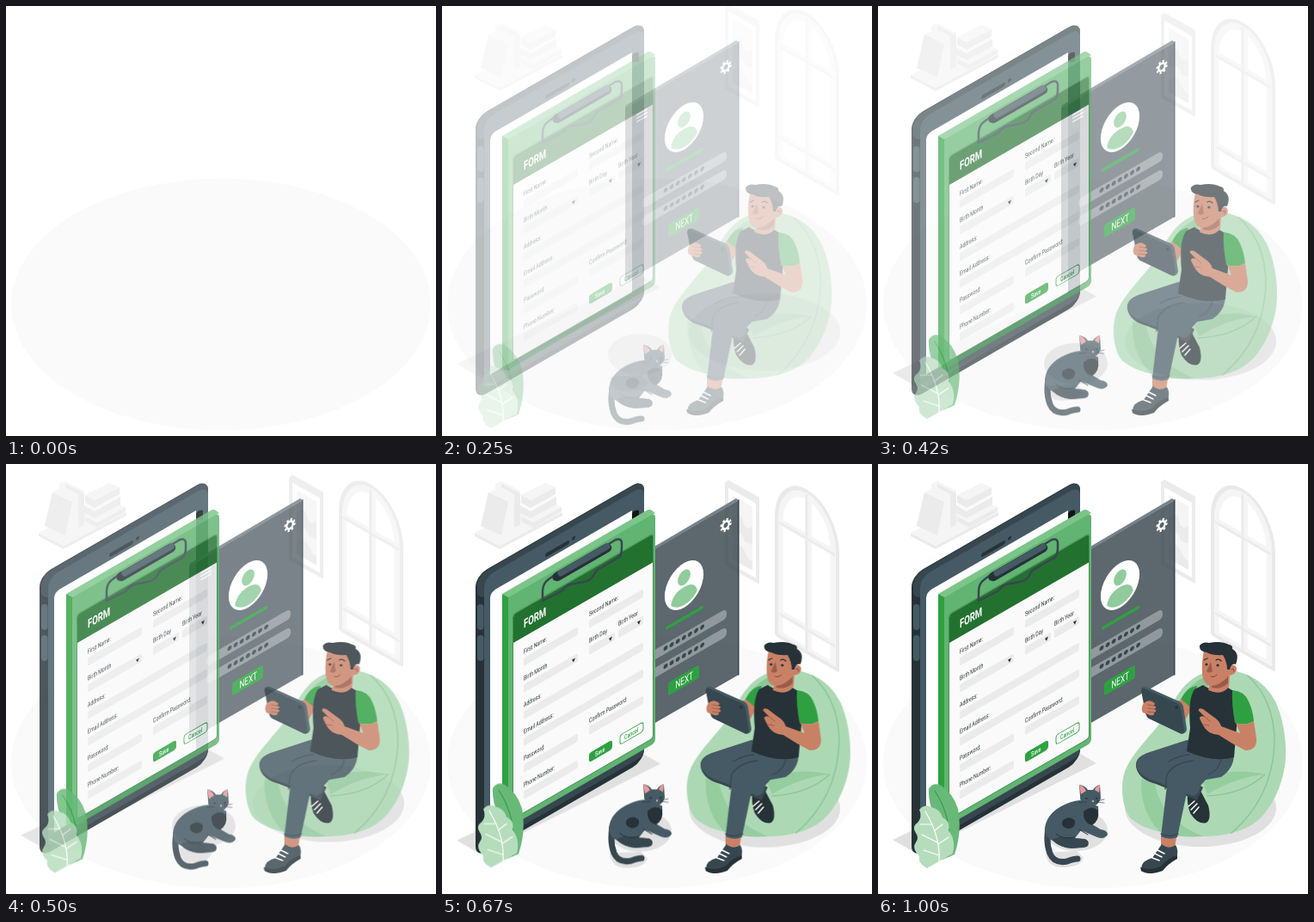
An HTML page that plays this animation: 500x500 px, repeating every 1040 ms.

```html
<!DOCTYPE html>
<html lang="en">
<head>
<meta charset="utf-8">
<title>Form</title>
<style>
  html, body { margin: 0; width: 100%; height: 100%; overflow: hidden; background: #fff; }
  svg { display: block; width: 100vw; height: 100vh; }
  text { font-family: Roboto, "Open Sans", sans-serif; }
  .line { fill: none; stroke-linecap: round; stroke-linejoin: round; }
  .ink { fill: #263238; } .slate { fill: #37474f; } .steel { fill: #455a64; }
  .green { fill: #2fa042; } .skin { fill: #c98166; } .soft { fill: #ebebeb; }
  .pale { fill: #f5f5f5; } .mint { fill: #acd9b3; }
</style>
</head>
<body>
<svg viewBox="0 0 500 500">
  <ellipse cx="250" cy="347" rx="244" ry="146.500" fill="#fafafa"/>

  <g data-move="fade">
    <path class="soft" d="M38 80L67 95L140 56V60L67 99L38 84Z"/>
    <path class="pale" d="M38 80L111 41L140 56L67 95Z"/>
    <path class="pale" d="M62 23L69 20L91 31V71L84 75L62 64Z"/>
    <path class="soft" d="M69 23L91 34V71L84 74V35L69 27Z"/>
    <path class="pale" d="M54 33L60 30L84 41L76 80L69 83L45 72Z"/>
    <path class="soft" d="M54 33L77 44L69 83L45 72Z"/>
    <path class="soft" d="M92 61L106 68L139 50V55L106 74L92 67Z"/>
    <path class="pale" d="M92 61L124 43L139 50L106 68Z"/>
    <path class="soft" d="M91 48L103 55L133 38V47L103 63L91 57Z"/>
    <path fill="#fafafa" d="M91 48L121 31L133 38L103 55Z"/>
    <path class="soft" d="M92 36L103 42L132 27V35L103 51L92 45Z"/>
    <path class="pale" d="M92 36L120 22L132 27L103 42Z"/>
  </g>

  <g data-move="down">
    <path class="soft" d="M329 21L333 18L369 38V139L365 137L329 117Z"/>
    <path fill="#fff" d="M333 27L365 45V132L333 114Z"/>
    <path class="pale" d="M338 36L361 49V123L338 110Z"/>
    <path class="soft" d="M338 62Q347 54 350 66T361 72V92Q352 92 350 84T338 82ZM338 98Q346 88 352 101T361 112V123L338 110Z"/>
    <g class="line" transform="matrix(1 .577 0 1 386 0)">
      <path stroke="#f5f5f5" stroke-width="9" d="M6 194V60A32 46 0 0 1 70 60V194Z"/>
      <path stroke="#f5f5f5" stroke-width="8" d="M40 15V193M6 62H70M6 168H70"/>
      <path stroke="#e9e9e9" stroke-width="4" d="M3 196V60A35.500 51 0 0 1 74 60V196Z"/>
      <path stroke="#ebebeb" stroke-width="3" d="M38 14V193M7 64H70M7 170H70"/>
    </g>
  </g>

  <g data-move="down" fill="#e0e0e0">
    <path d="M17 437L45 453L254 348L232 335Z"/>
    <ellipse cx="375" cy="400" rx="88" ry="45"/>
    <ellipse cx="230" cy="426" rx="37" ry="24"/>
    <path d="M195 452Q196 470 218 469Q236 468 239 458L231 450Z"/>
  </g>

  <g data-move="fade">
    <g transform="matrix(1 -.577 0 1 39 0)">
      <rect class="ink" y="130" width="196" height="328" rx="13"/>
      <rect class="slate" x="2" y="131" width="194" height="30" rx="12"/>
      <rect class="steel" x="10" y="138" width="186" height="314" rx="11"/>
      <path fill="#fff" d="M17 166Q17 159 24 159H182V438H17Z"/>
      <path class="slate" d="M10 439H196V445Q196 452 188 452H18Q10 452 10 444Z"/>
      <rect class="ink" x="81" y="151" width="28" height="4.500" rx="2.200"/>
      <circle class="ink" cx="114" cy="152" r="2"/>
    </g>
    <path fill="#101719" d="M221 65V58Q223 53 229 54V65Z"/>
    <g class="steel">
      <rect x="41" y="163" width="7.500" height="30" rx="3.700"/>
      <rect x="41" y="199" width="7.500" height="30" rx="3.700"/>
    </g>
  </g>

  <g data-move="fade">
    <path fill="#2c3a43" fill-opacity=".77" d="M213 118L345 42V245L213 321Z"/>
    <path fill="#76828a" d="M213 116L342 40L345 42L216 118Z"/>
    <path class="slate" d="M344 42L345.500 41V245L344 246Z"/>
    <g id="panel" transform="matrix(1 -.577 0 1 233 0)">
      <path class="line" stroke="#fff" stroke-width="1.800" d="M-6 123H5M-6 127H5M-6 131H5"/>
      <g fill="#fff" fill-opacity=".33">
        <rect y="224.500" width="98" height="11.500" rx="5"/>
        <rect y="245.500" width="98" height="11.500" rx="5"/>
      </g>
      <rect class="green" x="27" y="205" width="44" height="4" rx="2"/>
      <rect class="green" x="30" y="271.500" width="36" height="15.500" rx="2.500"/>
    </g>
    <g transform="matrix(.87 -.5 0 1 281.500 141)">
      <clipPath id="disc"><circle r="23"/></clipPath>
      <circle r="26" fill="#fff"/>
      <g fill="#8fcb9b">
        <circle cy="-9" r="8.500"/>
        <path d="M-18 18Q-17 2 0 2T18 18Q10 26 0 25T-18 18Z" clip-path="url(#disc)"/>
      </g>
    </g>
    <g transform="matrix(.87 -.4 0 1 330 71)" fill="none" stroke="#fff">
      <circle r="4.300" stroke-width="2.600"/>
      <circle r="6.300" stroke-width="2.600" stroke-dasharray="2.500 2.448"/>
    </g>
  </g>

  <g data-move="fade">
    <path class="green" d="M70 151L79 154V424L73 423Q70 421 70 417Z"/>
    <path fill="#7cc589" d="M70 151L238 54Q241 52 244 54L248 57L90 160L77 155Z"/>
    <path fill="#61b471" d="M77 158Q77 155 80 153.500L243 59.500Q248 57 248 62V319Q248 324 244 326.500L82 420Q77 423 77 417Z"/>
    <g id="form" transform="matrix(1 -.577 0 1 95 0)">
      <rect x="-13" y="167" width="164" height="239" rx="4" fill="#429253"/>
      <rect x="-12" y="168" width="162" height="237" rx="3" fill="#fafafa"/>
      <path fill="#22712f" d="M-12 201V171Q-12 168 -9 168H147Q150 168 150 171V201Z"/>
    </g>
    <g class="line">
      <path stroke="#37474f" stroke-width="2.500" d="M135 126L124 134Q117 139 117 148V159L135 150Q140 148 143 144Q148 139 155 139L165 137Q173 136 177 128Q179 123 184 121L205 109Q209 106 209 98V91Q208 86 202 88L194 93"/>
      <path stroke="#263238" stroke-width="10.500" d="M134 131L192 97.500"/>
      <path stroke="#455a64" stroke-width="7" d="M138 127L192 96"/>
      <path stroke="#263238" stroke-width="7" d="M132 132V132"/>
    </g>
  </g>

  <g data-move="left">
    <path class="mint" d="M392 240C424 236 450 252 462 276C472 297 475 324 474 343C472 367 463 390 449 407C434 425 408 433 378 433C342 433 306 426 292 410C284 397 282 376 286 361C294 334 324 312 341 282C352 259 367 243 392 240Z"/>
    <path fill="#95cd9f" d="M306 366C305 395 315 417 331 430C346 433 362 434 378 433C350 421 328 404 322 372Z"/>
    <path fill="#95cd9f" d="M376 366Q415 352 450 361Q416 364 383 384Z"/>
    <path fill="#8bc797" d="M360 262Q378 245 392 244L378 268L350 290Z"/>
    <path class="line" stroke="#8bc797" stroke-width="1.500" d="M430 246Q462 276 461 326Q458 389 411 429M450 361Q425 384 383 386"/>

    <path class="skin" d="M329 433L347 434L345 447Q337 453 329 446Z"/>
    <path class="ink" d="M360 384Q359 395 363 406Q372 420 382 417Q388 413 384 397L374 378Z"/>
    <path class="line" stroke="#fff" stroke-width="1.500" d="M361 398L368 392M364 402L371 395M367 406L373 399"/>
    <path class="slate" d="M306 470Q307 461 319 458L330 442Q338 449 346 443Q350 449 347 458Q336 463 330 472Q316 479 306 473Z"/>
    <path class="line" stroke="#fff" stroke-width="1.600" d="M319 458L327 461M322 453L330 457M325 449L333 453"/>
    <path class="ink" d="M305 469Q317 474 330 467Q337 458 348 455V459Q337 465 331 473Q315 479 306 473Z"/>

    <path class="slate" d="M361 321L312 337Q299 341 300 352Q303 367 323 372L371 391L378 376L337 349Z"/>
    <path class="steel" d="M359 321L316 335Q300 340 300 351Q304 363 323 369L366 386Q374 384 375 374L405 340Z"/>
    <path class="steel" d="M360 320L414 337Q414 354 399 364L371 369Q361 371 358 387L348 434Q339 438 329 433L336 374Q339 360 351 354L375 340Z"/>
    <path class="line" stroke="#37474f" stroke-width="1.300" d="M366 345Q345 347 336 361L334 378M399 343Q397 356 384 361M329 430Q338 435 349 430M362 338Q349 339 338 346"/>

    <path class="green" d="M371 258Q359 259 352 274L366 290Z"/>
    <path class="skin" d="M353 274L341 278L336 290L354 303L365 284Z"/>
    <path class="ink" d="M378 257Q389 266 405 259L415 265Q421 281 417 306L414 341Q390 348 359 334L363 307Q360 274 368 262Z"/>
    <path class="skin" d="M388 246H409L408 259Q400 270 384 263Z"/>
    <path fill="#9c5b49" d="M388 253Q399 257 407 247V255Q398 263 388 260Z"/>
    <path class="green" d="M412 263Q426 264 431 276Q436 287 437 299Q427 305 415 301Q411 279 412 263Z"/>
    <path class="skin" d="M416 301Q427 305 437 299L440 319Q441 333 427 333Q411 325 396 315Q383 314 378 304L374 296Q374 292 380 294L373 287Q372 283 378 285L390 294Q397 298 399 305L421 313Z"/>
    <path class="line" stroke="#9c5b49" stroke-width="1" d="M380 294L386 299M378 303L385 304"/>

    <path class="steel" d="M306 263Q306 258 312 259L350 276Q354 278 355 282L359 308Q359 313 353 314L314 295Z"/>
    <path class="slate" d="M306 263Q306 260 310 261L347 278Q351 280 352 284L356 310Q356 314 351 313L315 296Q312 294 311 290Z"/>
    <circle class="ink" cx="347" cy="283" r="1.700"/>
    <path class="skin" d="M309 278Q315 273 320 277Q324 279 320 281Q326 282 321 285Q326 287 321 289Q322 293 316 292L308 289Q305 284 309 278Z"/>
    <path class="line" stroke="#9c5b49" stroke-width=".9" d="M314 280L320 281M314 284L321 285M314 288L321 289"/>

    <path class="skin" d="M379 217Q376 232 377 243Q378 257 387 258Q398 258 407 246Q417 245 417 238Q416 232 409 234L407 216Z"/>
    <path class="ink" d="M374 211Q378 206 385 208Q399 205 408 210Q413 211 412 215Q421 220 416 233Q411 231 409 239L406 239Q406 230 401 222Q390 223 382 219Q373 218 374 211Z"/>
    <path fill="#9c5b49" d="M387 230L382 241Q385 244 389 241Z"/>
    <g class="ink"><circle cx="382" cy="233" r="1.600"/><circle cx="395" cy="234" r="1.600"/></g>
    <path class="line" stroke="#263238" stroke-width="1.300" d="M379 228L383 226M393 228Q396 226 399 229"/>
    <path class="line" stroke="#7e4338" stroke-width="1" d="M387 247Q390 249 394 245M411 239Q414 236 414 241"/>
  </g>

  <g data-move="up">
    <path class="line" stroke="#37474f" stroke-width="7" d="M198 424Q195 440 200 453Q205 465 220 462Q228 459 232 459"/>
    <path class="steel" d="M235 391Q224 392 213 398Q195 408 194 425Q194 434 203 438Q212 446 225 447L240 446Q247 443 244 438Q242 436 229 435L236 426L255 434Q263 437 267 431Q267 426 259 425L249 419Q258 409 256 398Z"/>
    <path class="slate" d="M203 437Q210 432 222 435L241 436Q247 440 243 445L225 447Q211 446 203 437Z"/>
    <path class="ink" d="M239 404Q249 396 256 403Q258 414 249 420Q238 417 239 404ZM215 414Q223 408 229 415Q230 424 220 424Q211 421 215 414Z"/>
    <path class="line" stroke="#263238" stroke-width="1" d="M207 430Q213 437 229 434M234 425L244 431"/>
    <path class="steel" d="M234 373Q241 374 244 379H250Q253 374 258 373L259 389Q255 400 244 398Q234 394 235 386Z"/>
    <path fill="#e99a99" d="M234 373Q240 375 242 380L236 384ZM258 373Q253 375 252 379L257 382Z"/>
    <path class="ink" d="M241 388L245 389L242 390ZM252 389L256 387L255 390Z"/>
    <path class="line" stroke="#263238" stroke-width=".6" d="M254 392L263 390M254 393L263 394M242 393L233 394"/>
    <circle cx="250" cy="392" r="1.200" fill="#e99a99"/>
  </g>

  <g data-move="up">
    <path fill="#68b978" d="M59 378Q63 370 72 373Q87 382 93 401Q98 427 89 454L75 460Q78 429 66 410Q58 393 59 378Z"/>
    <path class="line" stroke="#3b9d4d" stroke-width="1.300" d="M66 380Q88 413 82 456"/>
    <path fill="#b5ddbc" d="M48 402Q54 395 62 399Q72 401 75 411Q85 416 82 426Q91 437 87 453L57 470Q46 464 48 456Q39 447 44 440Q48 435 44 429Q39 422 46 417Q52 410 48 402Z"/>
    <path class="line" stroke="#fff" stroke-width="1.200" d="M55 404Q73 434 71 462M66 426L75 419M70 442L82 434M62 419L49 419M69 440L51 431M71 455L53 449"/>
  </g>
</svg>

<script>
const ns = "http://www.w3.org/2000/svg";
const form = document.getElementById("form");
const panel = document.getElementById("panel");

function add(parent, tag, attrs, text) {
  const el = document.createElementNS(ns, tag);
  for (const key in attrs) el.setAttribute(key, attrs[key]);
  if (text) el.textContent = text;
  parent.append(el);
  return el;
}

// Condensed lettering on the slanted plane.
const label = (parent, text, x, y, size, fill, weight = 400) =>
  add(parent, "text", {
    transform: `translate(${x} ${y}) scale(.68 1)`,
    "font-size": size, "font-weight": weight, fill
  }, text);

function field(text, x, row, width, select) {
  const y = 221 + row * 31;
  label(form, text, x, y, 7.7, "#263238");
  add(form, "rect", { x, y: y + 4.5, width, height: 9.5, rx: 2, fill: "#ebebeb" });
  if (select) {
    add(form, "path", { d: `M${x + width - 7} ${y + 8}h4l-2 4z`, fill: "#263238" });
  }
}

label(form, "FORM", 0, 191, 14, "#fff", 700);
field("First Name:", 0, 0, 63);
field("Second Name:", 76, 0, 63);
field("Birth Month", 0, 1, 63, true);
field("Birth Day", 76, 1, 30, true);
field("Birth Year", 110, 1, 29, true);
field("Address:", 0, 2, 139);
field("Email Address:", 0, 3, 139);
field("Password:", 0, 4, 63);
field("Confirm Password:", 76, 4, 63);
field("Phone Number:", 0, 5, 63);

add(form, "rect", { x: 76, y: 380, width: 27, height: 11, rx: 3, fill: "#2fa042" });
label(form, "Save", 83, 388.3, 7.7, "#fff", 500);
add(form, "rect", { x: 112, y: 380, width: 27, height: 11, rx: 3, fill: "#fff", stroke: "#2fa042", "stroke-width": .9 });
label(form, "Cancel", 117, 388.3, 7.7, "#2fa042", 500);

for (const cy of [229.7, 250.7]) {
  for (let i = 0; i < 7; i++) {
    add(panel, "circle", { cx: 27 + i * 7.1, cy, r: 2.5, fill: "#37474f" });
  }
}
label(panel, "NEXT", 38.5, 283.5, 12, "#fff");

const starts = { fade: "0, 0", up: "0, 30px", down: "0, -30px", left: "-30px, 0" };
const moves = [...document.querySelectorAll("[data-move]")].map(el => {
  const move = el.animate([
    { opacity: 0, transform: `translate(${starts[el.dataset.move]})` },
    { opacity: 1, transform: "translate(0, 0)" }
  ], { duration: 1000, fill: "both", easing: "cubic-bezier(.36, -.01, .5, 1.38)" });
  move.pause();
  return move;
});

const loop = 1040, fps = 24;
const origin = performance.now();

function draw(now) {
  const time = Math.max(0, now - origin) % loop;
  const step = Math.floor((time + 5) * fps / 1000);
  const at = step < 2 ? 0 : Math.min(1000, (step + 1) * 1000 / fps);
  for (const move of moves) move.currentTime = at;
  requestAnimationFrame(draw);
}
draw(origin);
</script>
</body>
</html>
```
